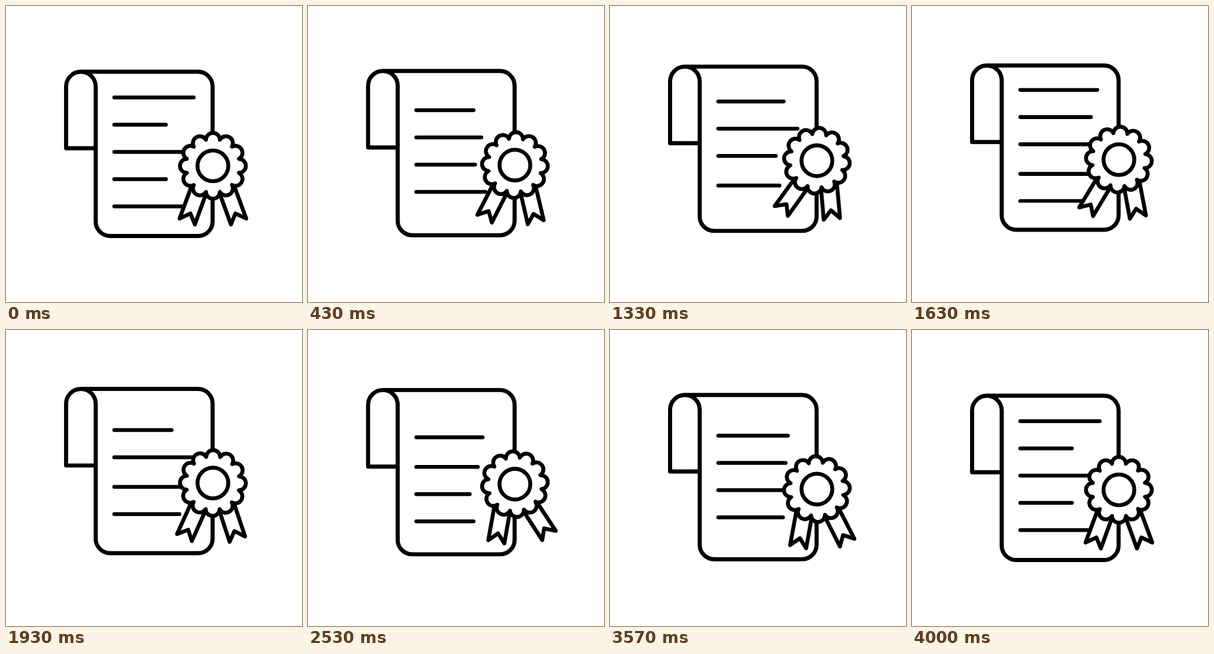
Recreate the animation shown at these times as an HTML page. Size 500x500 px, loop 4030 ms.

```html
<!DOCTYPE html>
<html lang="en">
<head>
<meta charset="utf-8">
<title>Certificate</title>
<style>
  html, body { margin: 0; width: 100%; height: 100%; overflow: hidden; background: #fff; }
  svg { display: block; width: 100%; height: 100%; }
</style>
</head>
<body>
<svg viewBox="0 0 500 500" fill="none" stroke="#000" stroke-width="6.9" stroke-linecap="round" stroke-linejoin="round">
  <clipPath id="window"><rect x="160" y="149" width="180" height="193.8"/></clipPath>
  <g id="card">
    <path d="M127 111H324.5A24.5 25 0 0 1 349 136V364A24.5 24.5 0 0 1 324.5 388.5H176A24.5 24.5 0 0 1 151.5 364V136A25 25 0 0 0 101.5 136V240.3H151.5"/>
    <g id="lines" clip-path="url(#window)" stroke-width="6.6"></g>
    <g transform="translate(349.5 270)" fill="#fff" stroke-width="6.6">
      <path id="leftRibbon" d="M-4.6 28L-30.5 99L-38 80.5L-56.3 89L-30 18Z"/>
      <path id="rightRibbon" d="M4.6 28L30.5 99L38 80.5L56.3 89L30 18Z"/>
      <path id="rosette"/>
      <circle r="26"/>
    </g>
  </g>
</svg>
<script>
const LOOP = 4030, CYCLE = 4000, FPS = 30;
const LEFT = 183, SHORT = 270, LONG = 317;
const EXIT = 145, WRAP = 234, SPEED = 0.0592, DELAY = 40;

// Each line swings between long and short; turns are the times of its extremes.
const lines = [
  { y: 154.5, long: true,  turns: [0, 913, 1963, 2926, CYCLE] },
  { y: 200.5, long: false, turns: [0, 1450, 2400, 3200, CYCLE] },
  { y: 246.5, long: true,  turns: [0, 850, 1820, 2835, CYCLE] },
  { y: 292.5, long: false, turns: [0, 1275, 2215, 3100, CYCLE] },
  { y: 338.5, long: true,  turns: [0, 1040, 2000, 3110, CYCLE] }
];

const byId = id => document.getElementById(id);
const ease = u => (1 - Math.cos(Math.PI * u)) / 2;

function tween(t, times, values) {
  let i = 0;
  while (i < times.length - 2 && t >= times[i + 1]) i++;
  const u = ease((t - times[i]) / (times[i + 1] - times[i]));
  return values[i] + (values[i + 1] - values[i]) * u;
}

function swing(t, size, first = 1000, second = 3000) {
  return tween(t, [0, first, second, CYCLE], [0, size, -size, 0]);
}

// A ring of semicircles that meet at the notch radius.
function scallops(count, notch) {
  const radius = notch * Math.sin(Math.PI / count);
  const point = i => {
    const a = (i - 0.5) * 2 * Math.PI / count;
    return `${(notch * Math.sin(a)).toFixed(2)} ${(-notch * Math.cos(a)).toFixed(2)}`;
  };
  let d = 'M' + point(0);
  for (let i = 1; i <= count; i++) d += `A${radius} ${radius} 0 0 1 ${point(i)}`;
  return d + 'Z';
}

byId('rosette').setAttribute('d', scallops(12, 45.6));
for (const line of lines) {
  line.el = document.createElementNS('http://www.w3.org/2000/svg', 'path');
  line.ends = line.turns.map((_, i) => (i % 2 === 0) === line.long ? LONG : SHORT);
  byId('lines').append(line.el);
}

function drawLine(line, t) {
  let y = line.y - SPEED * Math.max(0, t - DELAY);
  if (y < EXIT) y += WRAP;
  line.el.setAttribute('d', `M${LEFT} ${y}H${tween(t, line.turns, line.ends)}`);
}

function transform(id, value) {
  byId(id).setAttribute('transform', value);
}

function render(time) {
  const t = Math.floor((time % LOOP + 5) * FPS / 1000) * 1000 / FPS;
  transform('card', `translate(0 ${tween(t, [0, CYCLE / 2, CYCLE], [0, -11.5, 0])})`);
  transform('leftRibbon', `rotate(${swing(t, 17.5, 1000, 3200)} -18.5 28)`);
  transform('rightRibbon', `rotate(${swing(t, 17.5)} 18.5 28)`);
  transform('rosette', `rotate(${swing(t, 6)})`);
  lines.forEach(line => drawLine(line, t));
}

const start = performance.now();
function tick() {
  render(performance.now() - start);
  requestAnimationFrame(tick);
}
tick();
</script>
</body>
</html>
```
